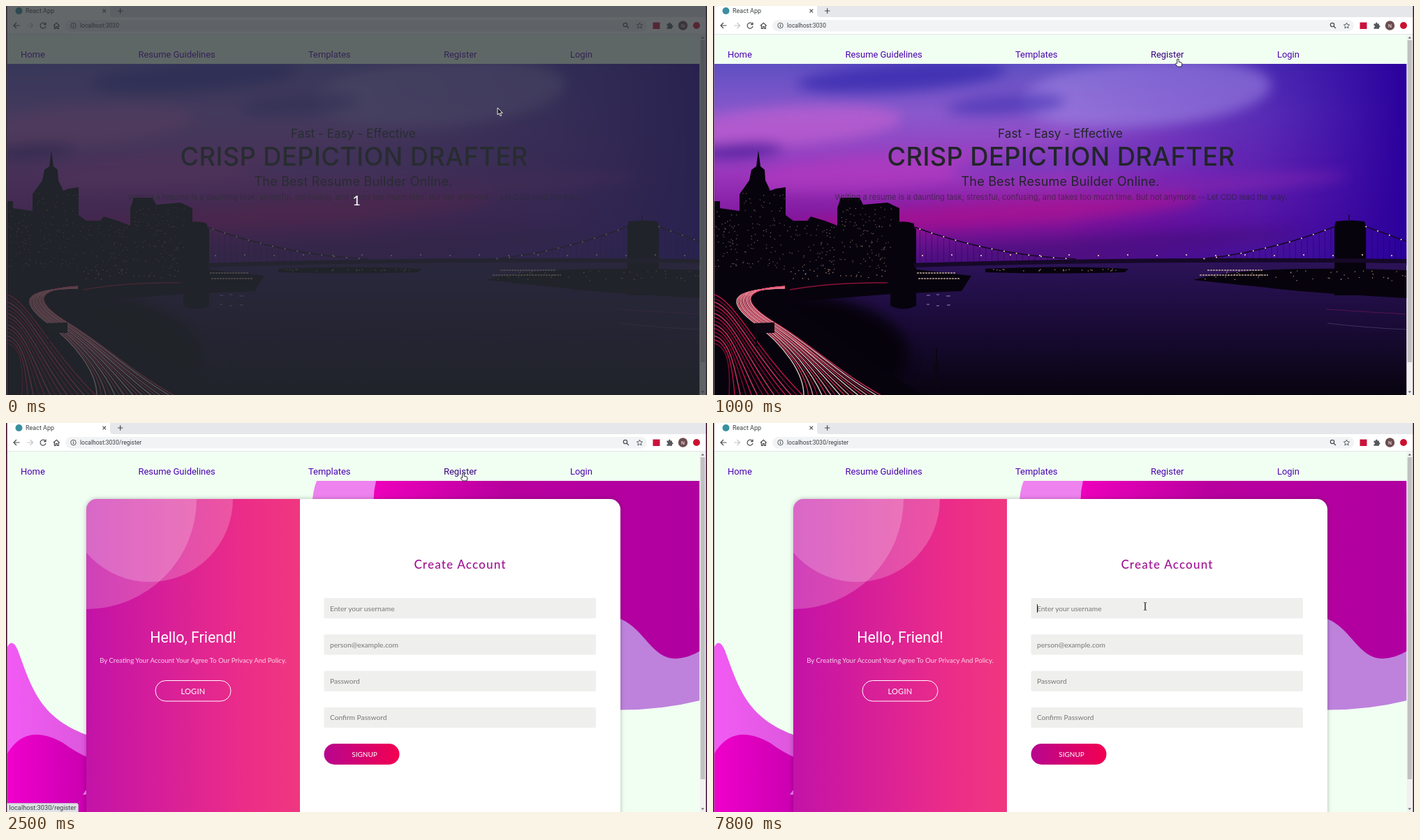
An HTML page for the animation above (8 s loop, 1004 by 558 pixels).

```html
<!DOCTYPE html>
<html lang="en">
<head>
<meta charset="utf-8">
<title>React App</title>
<style>
html, body { margin: 0; width: 100%; height: 100%; overflow: hidden; background: #fff }
svg { display: block; width: 100%; height: 100% }
text { font-family: Roboto, sans-serif; white-space: pre }
.mid { text-anchor: middle }
.ui { font-size: 8.5px; fill: #3c4043 }
.icon { fill: none; stroke: #4a4d51; stroke-width: 1.2 }
.nav { font-size: 12.95px; fill: #4a00b0 }
.hero { font-family: Inter, sans-serif; fill: #212529; text-anchor: middle }
.form { font-family: Lato, sans-serif }
.hint { font-size: 10.2px; fill: #777 }
.soft { filter: blur(9px) }
.cursor { stroke-linejoin: round }
</style>
</head>
<body>
<svg viewBox="0 0 1004 558" preserveAspectRatio="none">
<defs>
  <linearGradient id="sky" x2="0" y2="1">
    <stop stop-color="#5f50c2"/><stop offset=".25" stop-color="#8a58cc"/>
    <stop offset=".55" stop-color="#9a35bb"/><stop offset=".8" stop-color="#7c1399"/>
    <stop offset="1" stop-color="#4c1080"/>
  </linearGradient>
  <linearGradient id="blue">
    <stop offset=".5" stop-color="#2c00a4" stop-opacity="0"/>
    <stop offset=".78" stop-color="#3a12a8" stop-opacity=".6"/>
    <stop offset="1" stop-color="#2a009c"/>
  </linearGradient>
  <linearGradient id="water" x2="0" y2="1">
    <stop stop-color="#2c1358"/><stop offset=".4" stop-color="#1c0c3c"/><stop offset="1" stop-color="#080410"/>
  </linearGradient>
  <linearGradient id="panel"><stop stop-color="#c312a8"/><stop offset=".75" stop-color="#ec2d88"/><stop offset="1" stop-color="#f03780"/></linearGradient>
  <linearGradient id="button"><stop stop-color="#b8068f"/><stop offset="1" stop-color="#f20050"/></linearGradient>
  <linearGradient id="blob"><stop stop-color="#ee00bc"/><stop offset=".4" stop-color="#b8009e"/><stop offset="1" stop-color="#b000a0"/></linearGradient>
  <linearGradient id="wave"><stop stop-color="#f000cc"/><stop offset="1" stop-color="#c800ae"/></linearGradient>
  <linearGradient id="wave2"><stop stop-color="#f25af4"/><stop offset="1" stop-color="#dc58dc"/></linearGradient>
  <clipPath id="page"><path d="M2 83H993.5V558H2z"/></clipPath>
  <clipPath id="side"><path d="M115 558V124a15 15 0 0 1 15-15H421V558z"/></clipPath>
</defs>

<g id="home" clip-path="url(#page)">
  <path fill="url(#sky)" d="M2 83H994V372H2z"/>
  <path fill="url(#blue)" d="M2 83H994V372H2z"/>
  <g id="clouds" class="soft"></g>
  <path fill="url(#water)" d="M2 368H994V558H2z"/>
  <ellipse class="soft" cx="90" cy="500" rx="190" ry="90" fill="#06020c"/>
  <path fill="#07030d" d="M2 280h8v10l28 4v-24l14-20 3-15 7-5 3-23 3 23 6 5 1 15 7 15 8-3 14-2v40l11 8h20l5-6 20 6 18 7v-25l5-15h27l5 10 35-3 17 8v85l103 12-14 22-100 4-150 12 100 70 100 68H2z"/>
  <path fill="#07030d" d="M258 311q16-4 30 1v6l3 2v110q-18 9-37 0V318zM892 309q20-3 41 0l2 6v100h-45v-98zM390 377q110-5 205 0l-5 5q-100 3-200 0zM688 393q70-22 306-14v40q-150-8-200-15z"/>
  <g fill="none" stroke="#160828">
    <path stroke-width="6" d="M288 372Q600 362 994 366"/>
    <path id="hangers" stroke-width=".6" opacity=".6"/>
    <path id="cables" stroke-width="1.6" d="M288 317Q400 358 520 363M700 363Q800 352 892 316M934 316L994 338"/>
    <path stroke-width="1.5" d="M911 310v-11"/>
  </g>
  <path id="windows" stroke="#d0a89a" stroke-width="1.1" opacity=".55"/>
  <path id="shore" stroke="#eeb698" stroke-width="1.2" opacity=".75"/>
  <path id="lamps" stroke="#ffdcc0" stroke-width="2" stroke-linecap="round"/>
  <path stroke="#cbb0a0" stroke-width="2" stroke-dasharray="3 1" d="M708 379h80M697 386h98M292 383h55M294 391h60" opacity=".7"/>
  <path stroke="#8070b0" stroke-width="2" opacity=".6" d="M306 415h5M320 414h4M334 416h6M306 428h4M320 430h4M335 429h5"/>
  <path fill="none" stroke="#7a1860" d="M878 435q60 4 116 7" opacity=".6"/>
  <path fill="none" stroke="#5a4878" d="M880 455q60 7 114 9" opacity=".6"/>
  <g id="trails" fill="none"></g>
  <path fill="#0c0610" d="M59 455l29-1v15H60zM61 468h2v20h-2zM317 513h6v11h-6zM319 490h2v68h-2z"/>
  <text class="hero" x="497.5" y="189" font-size="17.2">Fast - Easy - Effective</text>
  <text class="hero" x="498.5" y="229" font-size="36.3" font-weight="500" letter-spacing=".4">CRISP DEPICTION DRAFTER</text>
  <text class="hero" x="497.5" y="257.5" font-size="18" letter-spacing=".2">The Best Resume Builder Online.</text>
  <text class="hero" x="498.5" y="277.5" font-size="11" opacity=".62">Writing a resume is a daunting task; stressful, confusing, and takes too much time. But not anymore -- Let CDD lead the way.</text>
</g>

<g id="register" clip-path="url(#page)">
  <path fill="#f1fff3" d="M2 83H994V558H2z"/>
  <path fill="#ee82ee" d="M445 83q-6 14-7 40h110V83z"/>
  <path fill="#be82dc" d="M860 270H994V398Q930 414 860 411z"/>
  <path fill="url(#blob)" d="M530 83q-5 20-3 40l353 158C915 296 925 338 959 338Q978 337 994 327V83z"/>
  <path fill="url(#wave2)" d="M2 321Q9 308 17 326C38 384 50 424 120 449V558H2z"/>
  <path fill="url(#wave)" d="M2 474C24 437 56 444 82 459Q99 472 120 481V558H2z"/>
  <path fill="#ee82ee" d="M110 533l6-8v8z"/>
  <path fill="#fff" style="filter:drop-shadow(0 0 3px #0004)" d="M115 570V124a15 15 0 0 1 15-15H865a15 15 0 0 1 15 15V570z"/>
  <g clip-path="url(#side)">
    <path fill="url(#panel)" d="M115 109H421V558H115z"/>
    <circle cx="115" cy="109" r="158" fill="#fff" opacity=".2"/>
    <circle cx="206" cy="109" r="119" fill="#fff" opacity=".2"/>
  </g>
  <g fill="#fff" class="mid">
    <text x="268" y="314.5" font-size="21.4">Hello, Friend!</text>
    <text class="form" x="268" y="343.5" font-size="9.6" opacity=".8">By Creating Your Account Your Agree To Our Privacy And Policy.</text>
    <rect x="214" y="369.5" width="108" height="29.5" rx="14.7" fill="none" stroke="#fff"/>
    <text class="form" x="268" y="388.5" font-size="11" letter-spacing=".3">LOGIN</text>
    <rect x="455.5" y="460" width="108" height="30" rx="15" fill="url(#button)"/>
    <text class="form" x="513.5" y="478.5" font-size="10">SIGNUP</text>
  </g>
  <text class="form mid" x="650.5" y="209" font-size="17" font-weight="500" letter-spacing="1.2" fill="#a00f92">Create Account</text>
  <g id="fields"></g>
  <path id="caret" stroke="#222" d="M464.5 260v12"/>
</g>

<path fill="#f1fff3" d="M0 40H1004V83H0z"/>
<text class="nav" x="21" y="73.5">Home</text>
<text class="nav" x="189.5" y="73.5">Resume Guidelines</text>
<text class="nav" x="433" y="73.5">Templates</text>
<text class="nav" x="627" y="73.5" id="link">Register</text>
<text class="nav" x="808" y="73.5">Login</text>

<path fill="#e5e7ea" d="M0 0H1004V17H0z"/>
<path fill="#fff" d="M0 0H149V11q0 5 5 5H1004V40H0z"/>
<path stroke="#e3e5e6" d="M0 40.5H1004"/>
<circle cx="18.5" cy="7" r="5" fill="#3a8fa0"/>
<text class="ui" x="28" y="10.3" font-size="9" style="font-size:9px">React App</text>
<path class="icon" d="M138.5 4.7l4.6 4.6m0-4.6l-4.6 4.6M160 7h7.4m-3.7-3.7v7.4"/>
<path class="icon" d="M19.5 28H11m4-4l-4 4 4 4M56.3 25.7A4 4 0 1 0 57 29M57 23.6v3h-3M68 28.3l4.3-4 4.3 4M69.4 27.5v5h2v-3h2v3h2v-5"/>
<path class="icon" style="stroke:#c3c5c8" d="M30 28h8.5m-4-4l4 4-4 4"/>
<rect x="85" y="20" width="833" height="16.5" rx="8.2" fill="#f1f3f4"/>
<circle class="icon" cx="96.5" cy="28" r="3.8" style="stroke-width:.9"/>
<path class="icon" d="M96.5 27.4v2.6m0-4.2v.9"/>
<text class="ui" id="address" x="106" y="31.2"></text>
<circle class="icon" cx="887" cy="27" r="2.7"/><path class="icon" d="M889 29l3 3"/>
<path class="icon" style="stroke-width:.9" d="M907.5 24l1.2 2.7 2.9.3-2.2 2 .7 2.9-2.6-1.5-2.6 1.5.7-2.9-2.2-2 2.9-.3z"/>
<rect x="926.5" y="23.5" width="10" height="9.5" fill="#c8143c"/>
<path fill="#55585c" d="M946.5 25.5h2.5q0-2 1.3-2t1.3 2h2.4v2.4q1.6 0 1.6 1.3t-1.6 1.3v2.3h-7.5v-2.3q1.5 0 1.5-1.3t-1.5-1.3z"/>
<circle cx="969.5" cy="28" r="6.7" fill="#6d4c4f"/>
<text class="mid" x="969.5" y="30.6" font-size="7" fill="#fff">N</text>
<circle cx="989" cy="28" r="5" fill="#cc1030"/>

<path fill="#f1f1f1" d="M993.5 41H1002V558H993.5z"/>
<path fill="#c1c1c1" d="M994.7 49h6.3V511h-6.3z"/>
<path fill="#606060" d="M995.5 46.5l2.3-2.6 2.3 2.6zM995.5 552.5l2.3 2.6 2.3-2.6z"/>
<path fill="#3c0a2c" d="M0 0H1.6V558H0zM1002.5 0H1004V558H1002.5z"/>

<g id="status">
  <path fill="#dee1e6" stroke="#b9bcc0" stroke-width=".7" d="M1.5 545.5H101q2.5 0 2.5 2.5V558.5H1.5z"/>
  <text class="ui" x="4.5" y="555" style="font-size:9.25px">localhost:3030/register</text>
</g>

<g id="countdown">
  <path fill="#2a2f34" opacity=".73" d="M0 0H1004V558H0z"/>
  <text class="mid form" x="502" y="286" font-size="20" fill="#fff">1</text>
</g>

<path id="arrow" class="cursor" fill="#18181c" stroke="#fff" stroke-width=".9" d="M0 0V10L2.3 7.9 4 11.8 5.6 11.1 4 7.3H7.2z"/>
<path id="hand" class="cursor" fill="#fff" stroke="#18181c" stroke-width=".9" d="M-1.3 6.5V1a1.2 1.2 0 0 1 2.4 0V4.2l3 .6q1.7.4 1.7 2L5 11H-.7L-3.4 7.5q-.4-1.5.9-1.4z"/>
<path id="beam" class="cursor" fill="none" stroke="#333" d="M-2-5.5q2 0 2 1.2V4.3q0 1.2-2 1.2M2-5.5q-2 0-2 1.2V4.3q0 1.2 2 1.2"/>
</svg>

<script>
const $ = id => document.getElementById(id);
const show = (id, on) => $(id).style.display = on ? '' : 'none';
const range = (n, f) => Array.from({ length: n }, (_, i) => f(i)).join('');

let seed = 7;
const rnd = (a, b) => {
  seed = seed * 16807 % 2147483647;
  return +(a + (b - a) * seed / 2147483647).toFixed(1);
};

// cloud: x, y, rx, ry, colour, opacity
$('clouds').innerHTML = [
  [620, 125, 180, 48, '#9d82e2', .6], [270, 102, 150, 20, '#3a2cb0', .8],
  [420, 142, 85, 14, '#4434b4', .65], [110, 172, 160, 28, '#c862d0', .6],
  [40, 208, 60, 9, '#481c98', .85], [230, 238, 180, 24, '#b63cc2', .6],
  [540, 222, 200, 20, '#6838bc', .5], [400, 298, 300, 18, '#b4108e', .6],
  [710, 257, 200, 11, '#8c28b2', .5], [560, 345, 280, 14, '#46107c', .6]
].map(([x, y, rx, ry, c, o]) =>
  `<ellipse cx="${x}" cy="${y}" rx="${rx}" ry="${ry}" fill="${c}" opacity="${o}" transform="rotate(-4 ${x} ${y})"/>`).join('');

const dots = (n, x, y, w, h) => range(n, () => `M${rnd(x, x + w)} ${rnd(y, y + h)}h1.3`);
$('windows').setAttribute('d', dots(55, 3, 295, 33, 85) + dots(80, 42, 268, 60, 110) +
  dots(70, 106, 314, 70, 65) + dots(110, 181, 288, 74, 90));
$('shore').setAttribute('d', dots(45, 700, 380, 292, 14) + dots(25, 400, 377, 185, 3) + dots(30, 110, 378, 140, 14));

const cables = $('cables'), length = cables.getTotalLength();
const along = i => cables.getPointAtLength(length * (i + .5) / 28);
$('lamps').setAttribute('d', range(28, i => `M${along(i).x} ${along(i).y}h.01`) +
  range(17, i => `M${300 + i * 42} ${358 - i % 2}h.01`));
$('hangers').setAttribute('d', range(56, i => {
  const p = along(i / 2);
  return `M${p.x} ${p.y}V367`;
}));

const stroke = (d, c, w, o) => `<path d="${d}" stroke="${c}" stroke-width="${w}" opacity="${o}"/>`;
$('trails').innerHTML = range(14, i => {
  const f = i / 13;
  return stroke(`M2 ${414 + 70 * f}C${32 - 10 * f} ${424 + 65 * f} ${60 - 35 * f} ${490 + 30 * f} ${128 - 105 * f} 558`,
    ['#e0164c', '#8c1038', '#f04070'][i % 3], 1.5, .8);
}) + range(18, i => {
  const f = i / 17, x = 20 + 20 * f;
  return stroke(`M103 ${405 - 3 * f}C${x} 406 ${x} 425 ${60 + 30 * f} 455S${130 + 50 * f} 525 ${130 + 110 * f} 558`,
    ['#ffe4dc', '#e8305c', '#f6a8a8', '#a01840'][i % 4], 1.4, .85);
}) + stroke('M110 407Q170 396 250 397', '#c01848', 1.5, .7);

$('fields').innerHTML = ['Enter your username', 'person@example.com', 'Password', 'Confirm Password'].map((s, i) => {
  const y = 251 + 52.3 * i;
  return `<rect x="455.5" y="${y}" width="389.5" height="29.3" rx="2" fill="#efefee"/>
    <text class="form hint" x="464" y="${y + 18.5}">${s}</text>`;
}).join('');

// pointer path: time, x, y
const path = [[200, 704, 146], [400, 702, 148], [600, 694, 134], [1000, 666, 76], [1400, 656, 66],
  [1600, 655, 71], [1800, 655, 72], [3000, 655, 72], [3600, 619, 263]];
const blinks = [3500, 3700, 4000, 4600, 5200, 5900, 6400, 7200, 7800];

function pointer(t) {
  const step = t < 600 || t >= 1400 && t < 2000 ? 200 : 100;
  t = Math.floor(t / step) * step;
  const i = path.findIndex(p => p[0] > t);
  if (i < 0) return path.at(-1).slice(1);
  if (!i) return path[0].slice(1);
  const [t0, x0, y0] = path[i - 1], [t1, x1, y1] = path[i];
  let k = (t - t0) / (t1 - t0);
  if (t > 3000) k = k * k * (3 - 2 * k);
  return [x0 + (x1 - x0) * k, y0 + (y1 - y0) * k];
}

function draw(now) {
  const t = now % 8000, registered = t >= 2500, over = t >= 1000 && t < 3100;
  const [x, y] = pointer(t);
  const kind = over ? 'hand' : registered && y > 251 ? 'beam' : 'arrow';
  for (const id of ['arrow', 'hand', 'beam']) {
    show(id, id === kind);
    $(id).setAttribute('transform', `translate(${x} ${y})`);
  }
  show('countdown', t < 200);
  show('home', !registered);
  show('register', registered);
  show('status', t >= 1100 && t < 3200);
  show('caret', blinks.filter(b => b <= t).length % 2);
  $('link').style.fill = over ? '#34007c' : '';
  $('address').textContent = 'localhost:3030' + (registered ? '/register' : '');
  requestAnimationFrame(draw);
}
draw(performance.now());
</script>
</body>
</html>
```
